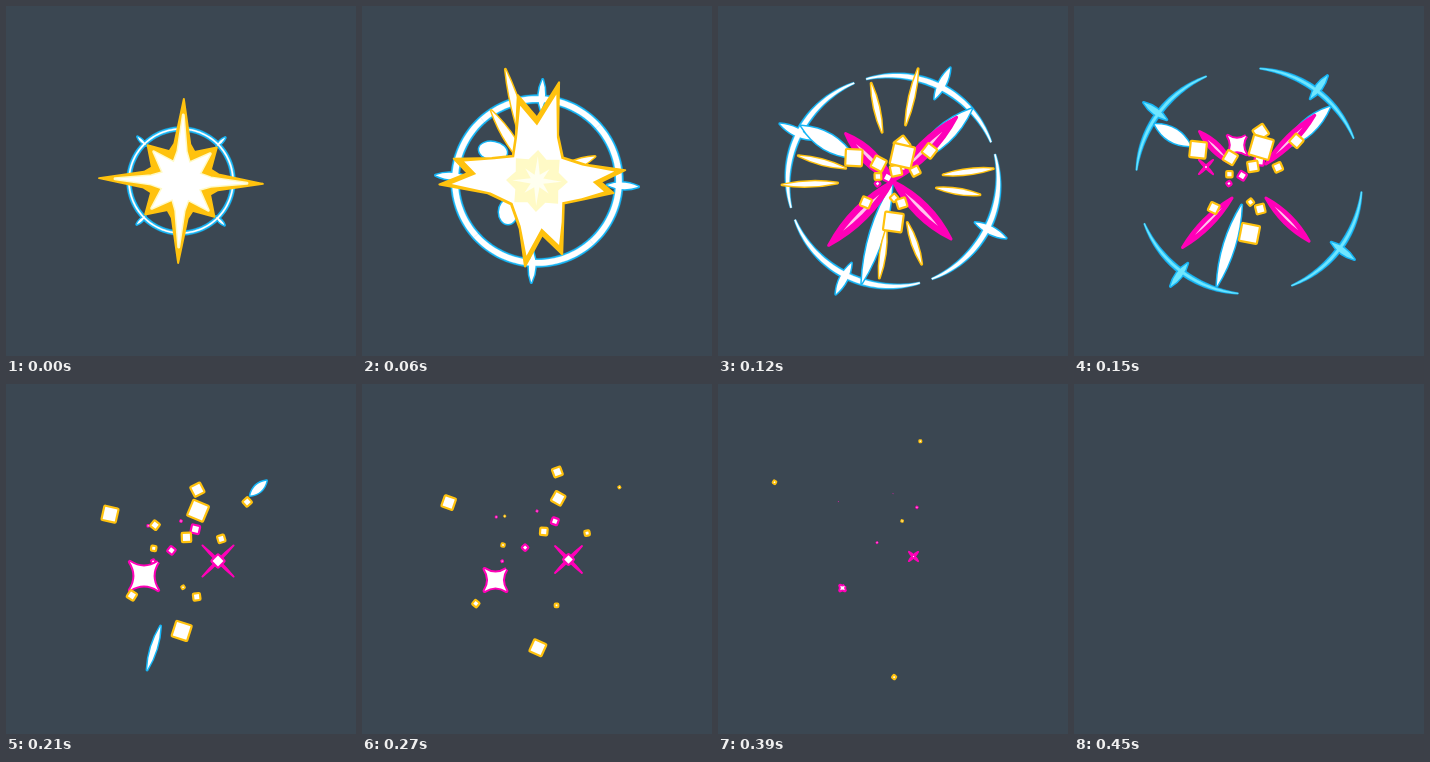
Write an HTML page with a canvas that moves like this. It is 350x350 px and loops after 540 ms.

```html
<!DOCTYPE html>
<html lang="en">
<head>
<meta charset="utf-8">
<title>Spark burst</title>
<style>
  html, body { margin: 0; width: 100%; height: 100%; overflow: hidden; background: #3b4752; }
  canvas { display: block; width: 350px; height: 350px; }
</style>
</head>
<body>
<canvas id="stage" width="350" height="350"></canvas>
<script>
const ctx = document.getElementById('stage').getContext('2d');
const BG = '#3b4752', WHITE = '#fff', GOLD = '#ffc20e', CREAM = '#fffac6';
const CYAN = '#16b5f5', AQUA = '#6fe6ff', PINK = '#ff00b8', ROSE = '#ffc4ee';
const C = 175, STEP = 30, LOOP = 540, RAD = Math.PI / 180;
const QUARTERS = [0, 90, 180, 270];

const mix = (a, b, u) => a + (b - a) * u;
const wave = (t, half) => Math.sin(Math.PI * t / half);

// angle 0 points up, clockwise
const at = (r, deg, x = C, y = C) => [x + r * Math.sin(deg * RAD), y - r * Math.cos(deg * RAD)];

// the outline lies behind the fill, so half of its width shows
function paint(fill, stroke, width) {
  if (stroke) {
    ctx.strokeStyle = stroke;
    ctx.lineWidth = width;
    ctx.stroke();
  }
  ctx.fillStyle = fill;
  ctx.fill();
}

// pairs of [radius, angle]
function shape(pairs, fill, stroke, width, x = C, y = C) {
  ctx.beginPath();
  for (const [r, a] of pairs) ctx.lineTo(...at(r, a, x, y));
  ctx.closePath();
  paint(fill, stroke, width);
}

// repeats the pairs in every quarter
function star(pairs, turn, fill, stroke, width) {
  shape(QUARTERS.flatMap(q => pairs.map(([r, a]) => [r, a + q + turn])), fill, stroke, width);
}

function spindle([x1, y1], [x2, y2], w, fill, stroke, line = 3) {
  const mx = (x1 + x2) / 2, my = (y1 + y2) / 2;
  const len = Math.hypot(x2 - x1, y2 - y1) || 1;
  const nx = (y1 - y2) / len * w, ny = (x2 - x1) / len * w;
  ctx.beginPath();
  ctx.moveTo(x1, y1);
  ctx.quadraticCurveTo(mx + nx, my + ny, x2, y2);
  ctx.quadraticCurveTo(mx - nx, my - ny, x1, y1);
  ctx.closePath();
  paint(fill, stroke, line);
}

// spindle on a line through the centre
const ray = (deg, from, to, ...look) => spindle(at(from, deg), at(to, deg), ...look);

function puff(x, y, rx, ry, turn) {
  ctx.beginPath();
  ctx.ellipse(x, y, rx, ry, turn * RAD, 0, 7);
  paint(WHITE, CYAN, 3);
}

function square(x, y, size, turn, color) {
  if (size < 1) return;
  const line = Math.min(4.4, size * 0.7);
  const r = (size - line) * Math.SQRT1_2;
  shape(QUARTERS.map(q => [r, q + 45 + turn]), WHITE, color, line, x, y);
}

function spark(x, y, r) {
  ctx.beginPath();
  ctx.moveTo(...at(r, 45, x, y));
  for (const q of QUARTERS)
    ctx.quadraticCurveTo(...at(r * 0.25, q + 90, x, y), ...at(r, q + 135, x, y));
  paint(WHITE, PINK, 4);
}

function cross(x, y, r) {
  for (const a of [45, 135])
    spindle(at(r, a, x, y), at(r, a + 180, x, y), 2, PINK, PINK, 2);
  square(x, y, r * 0.55, 45, PINK);
}

// four arcs that close into a circle at a half span of 45
function arcs(r, width, span, turn, color) {
  for (const q of QUARTERS) {
    const edge = [];
    for (let i = -20; i <= 20; i++) {
      const u = i / 20;
      const half = width / 2 * (span < 45 ? Math.cos(u * 1.3) : 1);
      edge.push([r + half, q + turn + u * span]);
      edge.unshift([r - half, q + turn + u * span]);
    }
    shape(edge, color, color, 0.3);
  }
}

function ring(t) {
  if (t > 180) return;
  const r = 52 + 66 * wave(t, 400);
  const turn = -44.5 + 4.44 * t ** 0.58;
  const width = 5 + 4.5 * wave(t, 165);
  const span = 45 - 31 * (Math.max(0, t - 90) / 90) ** 2;
  const reach = 6 + 12 * wave(t, 200), thick = 2.5 + 5 * wave(t, 200);
  const inner = t < 150 ? WHITE : AQUA;
  const marks = (...look) => {
    for (const q of QUARTERS) ray(q + turn, r + 4 - reach, r + 4 + reach, thick, ...look);
  };
  marks(CYAN, CYAN);
  arcs(r, width, span, turn, CYAN);
  arcs(r, Math.max(1, width - 3.4), span, turn, inner);
  marks(inner);
}

function flare(t) {
  const long = 1 + t / 300, fat = 1 + t / 140;
  const layer = (tip, neck, lean, dip, diag, ...look) => star(
    [[tip * long, 0], [neck * fat, lean], [dip * fat, 23], [diag * fat, 45],
      [dip * fat, 67], [neck * fat, 90 - lean]], 2, ...look);
  layer(82, 38, 12, 32, 49, GOLD, GOLD, 2);
  layer(66, 30, 8, 20, 40, WHITE, CREAM, 3);
}

// [angle, reach] of the eight flame tips, two for each arm
const tips = [
  [-12.6, 100], [12.6, 115], [83, 101], [99, 88],
  [161, 88], [188, 98], [268, 111], [285, 98]
];

function core(r) {
  star([[r, 0], [r * 0.75, 22], [r, 45], [r * 0.75, 67]], 2, CREAM);
  star([[r * 0.8, 0], [r * 0.22, 22], [r * 0.55, 45], [r * 0.22, 67]], 2, '#fffff0');
}

// one outline through all tips; the wider the gap, the deeper the valley
function blast(scale, waist, ...look) {
  const edge = [];
  tips.forEach(([a, reach], i) => {
    const [next, reach2] = tips[(i + 1) % tips.length];
    const gap = (next - a + 360) % 360, low = Math.min(reach, reach2) * scale;
    edge.push([reach * scale, a]);
    if (gap < 40) edge.push([low * (1 - gap / 90), a + gap / 2]);
    else edge.push([waist * 1.45, a + 12], [waist, a + gap / 2], [waist * 1.45, next - 12]);
  });
  shape(edge, ...look);
}

function burst() {
  puff(131, 145, 14, 9, 10);
  puff(146, 206, 9, 12, 0);
  for (const [a, reach] of [[-15.8, 116], [-33, 84], [67, 63]])
    ray(a, 10, reach, 9, WHITE, GOLD);
  blast(0.88, 35, GOLD, GOLD, 2);
  blast(0.77, 33, WHITE);
  core(31);
}

function fork([a, reach], [b, reach2]) {
  const mid = (a + b) / 2, notch = Math.min(reach, reach2) * 0.72;
  shape([[24, mid - 32], [58, a], [reach, a], [notch, mix(a, b, 0.3)], [notch * 1.1, mid],
    [notch, mix(a, b, 0.7)], [reach2, b], [58, b], [24, mid + 32]], WHITE, GOLD, 4.5);
  for (const u of [0.3, 0.7]) ray(mix(a, b, u), notch - 22, notch + 2, 3, GOLD);
}

function split() {
  ray(43, 55, 72, 6, WHITE, CYAN);
  ray(203, 40, 62, 7, WHITE, CYAN);
  star([[74, 45], [42, 90]], 0, PINK, PINK, 2);
  star([[62, 45], [30, 68], [30, 112]], 0, WHITE, ROSE, 3);
  puff(109, 133, 20, 12, 28);
  square(141, 149, 18, 5, GOLD);
  square(204, 151, 15, -8, GOLD);
  for (let i = 0; i < tips.length; i += 2) fork(tips[i], tips[i + 1]);
  core(25);
}

function shards(t) {
  const age = t - 150;
  // angle, inner end, width
  for (const [a, from, w] of [[-59, 68, 13], [47.5, 49, 14], [197, 25, 11]]) {
    const inner = from + age * 0.75, outer = 110 + age * 0.1;
    if (outer - inner > 8) ray(a, inner, outer, w * (1 - age / 130), WHITE, CYAN);
  }
  if (age > 30) return;
  [93, 85, 94, 70].forEach((reach, i) => {
    const a = 45 + i * 90, inner = 24 + age * 0.8, w = 9 - age * 0.16;
    ray(a, inner, reach + age * 0.1, w, PINK, PINK);
    ray(a, mix(inner, reach, 0.2), mix(inner, reach, 0.75), w * 0.25, ROSE);
  });
}

// flight end from the centre, size, time of vanishing
const goldBits = [
  [-104, -70, 19], [-38, -54, 15, 290], [24, -106, 15], [8, -36, 13],
  [25, -75, 24, 360], [97, -88, 14, 300], [59, -34, 11, 400], [-40, -20, 9, 370],
  [-72, 49, 12, 400], [3, 37, 9, 270], [23, 51, 12, 340], [1, 101, 21]
];
const pinkBits = [[21, -48, 12], [-14, -17, 10], [-41, -1, 7, 350], [-48, -53, 4], [0, -60, 4]];

function bits(list, t, color) {
  const way = ((t - 60) / 270) ** 0.65;
  list.forEach(([x, y, size, end = 440], i) => {
    if (t >= end) return;
    const left = 1 - ((t - 90) / (end - 90)) ** 2;
    square(C + x * way, C + 3 + y * way, size * left, 6 + i * 25 + (t - 150) / 9, color);
  });
}

function twinkles(t) {
  if (t === 150) {
    spark(163, 139, 13);
    cross(132, 161, 10);
  }
  if (t < 180) return;
  const u = (t - 210) / 120, fade = Math.min(1, (450 - t) / 120);
  spark(mix(138, 129, u), mix(192, 200, u), mix(20, 11, u) * fade);
  cross(mix(212, 201, u), mix(177, 174, u), mix(22, 16, u) * fade);
}

function draw(t) {
  ctx.fillStyle = BG;
  ctx.fillRect(0, 0, 350, 350);
  if (t >= 450) return;
  ring(t);
  if (t < 60) return flare(t);
  if (t < 90) return burst();
  if (t < 120) return split();
  shards(t);
  if (t < 150)
    for (const [a, reach] of tips) ray(a, reach * 0.5, reach, 5, WHITE, GOLD);
  bits(pinkBits, t, PINK);
  twinkles(t);
  bits(goldBits, t, GOLD);
}

ctx.lineJoin = 'round';
function tick() {
  draw(Math.floor(performance.now() % LOOP / STEP) * STEP);
  requestAnimationFrame(tick);
}
tick();
</script>
</body>
</html>
```
